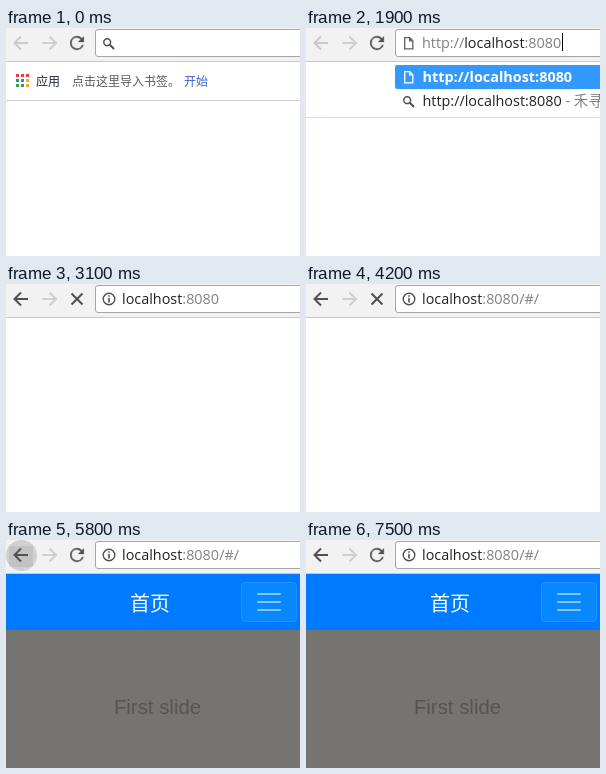
Recreate the animation shown at these times as an HTML page. Size 294 by 228 pixels, loop 8.9 s.

```html
<!DOCTYPE html>
<html lang="zh-CN">
<head>
<meta charset="utf-8">
<title>localhost:8080</title>
<style>
  html, body { margin: 0; width: 100%; height: 100%; overflow: hidden; background: #fff; }
  svg { display: block; width: 294px; height: 228px; }
  text { font-family: "Noto Sans CJK SC", "Noto Sans CJK", sans-serif; font-size: 12px; white-space: pre; }
  .url { font: 14.4px "Open Sans", "Noto Sans CJK SC", sans-serif; fill: #222; }
  .dim { fill: #808080; }
  .line { fill: none; stroke: #505050; stroke-width: 2; }
  .crisp { shape-rendering: crispEdges; }
  .layer { opacity: 0; }
</style>
</head>
<body>
<svg viewBox="0 0 294 228">
  <defs>
    <path id="arrow" class="line" d="M15 8.5 8.5 15l6.5 6.5M8.5 15H22"/>
    <path id="doc" d="M.7.7h5.1l3 3v8.1H.7zM5.6.9v3h3" fill="none" stroke-width="1.3"/>
    <g id="lens" fill="none" stroke="#505050">
      <circle cx="4.2" cy="4.2" r="3.4" stroke-width="1.5"/>
      <path d="m6.8 6.8 4.2 4.2" stroke-width="2"/>
    </g>
  </defs>

  <rect width="294" height="228" fill="#fff"/>

  <g id="page" class="layer">
    <rect y="34" width="294" height="56" fill="#007bff"/>
    <text x="144" y="71" text-anchor="middle" style="font-size:20px" fill="#fff">首页</text>
    <rect x="235.5" y="42.5" width="55" height="39" rx="3.5" fill="#0888ff" stroke="#1f92ff"/>
    <path d="M252 54h22m-22 8h22m-22 8h22" stroke="#fff" stroke-opacity=".5" stroke-width="2" stroke-linecap="round"/>
    <rect y="90" width="294" height="138" fill="#757470"/>
    <text x="151.5" y="174" text-anchor="middle" style="font:20.4px 'Liberation Sans',sans-serif" fill="#555">First slide</text>
  </g>

  <g id="bookmarks" class="layer">
    <g id="apps" class="crisp"></g>
    <text x="30" y="58" fill="#1c2340">应用</text>
    <text x="66" y="58" fill="#5a5a5a">点击这里导入书签。</text>
    <text x="178" y="58" fill="#3460d0">开始</text>
    <rect y="72" width="294" height="1" fill="#d2d2d2"/>
  </g>

  <g id="toolbar">
    <rect width="294" height="33" fill="#f2f2f2"/>
    <rect y="33" width="294" height="1" fill="#c8c8c8"/>
    <rect x="89.5" y="1.5" width="220" height="27" rx="2.5" fill="#fff" stroke="#a6a6a6"/>
    <use href="#arrow" transform="matrix(-1 0 0 1 58.5 0)" opacity=".22"/>
  </g>

  <rect id="hover" class="layer" x="3" y="6" width="24" height="21" rx="2" fill-opacity=".07"/>
  <circle id="ripple" class="layer" cx="15.5" cy="15.5" r="15.5" style="transform-origin:15.5px 15.5px"/>
  <rect id="pressed" class="layer" x="3" y="5" width="24" height="22" rx="2" fill-opacity=".13"/>

  <use id="backOff" class="layer" href="#arrow"/>
  <use id="backOn" class="layer" href="#arrow"/>
  <path id="reload" class="layer" fill="#505050" transform="translate(60.5 4.5) scale(.875)"
    d="M17.65 6.35A7.96 7.96 0 0 0 12 4a8 8 0 1 0 7.73 10h-2.08A6 6 0 1 1 12 6c1.66 0 3.14.69 4.22 1.78L13 11h7V4z"/>
  <path id="stop" class="layer line" d="m65.5 9.5 11 11m0-11-11 11"/>

  <use id="iconLens" class="layer" href="#lens" x="97" y="10"/>
  <use id="iconDoc" class="layer" href="#doc" x="98" y="9" stroke="#606060"/>
  <g id="iconInfo" class="layer">
    <circle cx="103" cy="15" r="5.8" fill="none" stroke="#505050" stroke-width="1.4"/>
    <path d="M103 11.2v1.6m0 1.2v4.5" stroke="#505050" stroke-width="1.6"/>
  </g>

  <text id="typed" class="layer url" x="116" y="20"><tspan class="dim">http://</tspan>localhost<tspan class="dim">:8080</tspan></text>
  <text id="host" class="layer url" x="116" y="20">localhost<tspan class="dim">:8080</tspan></text>
  <text id="hash" class="layer url dim" x="213.2" y="20">/#/</text>
  <rect id="caretStart" class="layer" x="116" y="5" width="1" height="18"/>
  <rect id="caretEnd" class="layer" x="256" y="5" width="1" height="18"/>

  <g id="suggest" class="layer">
    <rect y="34" width="294" height="56" fill="#fff"/>
    <rect y="89" width="294" height="1" fill="#dcdcdc"/>
    <rect x="89" y="37" width="220" height="24" rx="2" fill="#3399ff"/>
    <use href="#doc" x="98" y="43" stroke="#fff"/>
    <text class="url" x="116.5" y="54" style="font-weight:700;fill:#fff">http://localhost:8080</text>
    <use href="#lens" x="97" y="68"/>
    <text class="url" x="116.5" y="78">http://localhost:8080<tspan class="dim"> - 禾寻搜索</tspan></text>
  </g>

  <g id="menu" class="layer">
    <rect x="-.5" y="28.5" width="155" height="85" fill="#fff" stroke="#bcbcbc"/>
    <rect id="menuHover" class="layer" y="31" width="154" height="23" fill="#e8e8e8"/>
    <use href="#doc" x="11" y="37" stroke="#555"/>
    <use href="#doc" x="11" y="60" stroke="#555"/>
    <rect y="82" width="154" height="1" fill="#e2e2e2"/>
    <path d="M10 100.5a5.5 5.5 0 1 1 1.7 4M7.6 99.2l2.4 2.6 2.6-2.6M15.5 97.3v3.5l2.6 1.6" fill="none" stroke="#555" stroke-width="1.3"/>
    <g fill="#222">
      <text x="34" y="48">返回</text>
      <text x="34" y="71">新标签页</text>
      <text x="34" y="105">显示所有历史记录</text>
    </g>
  </g>
</svg>
<script>
  const LOOP = 8900;

  const red = '#ea3f3a', green = '#2f9e58', blue = '#3f7fe8', amber = '#f2ad1f';
  const grid = [red, red, red, green, blue, amber, green, green, amber];
  document.getElementById('apps').innerHTML = grid.map((fill, i) =>
    `<rect x="${10 + i % 3 * 5}" y="${46 + Math.floor(i / 3) * 5}" width="3" height="3" fill="${fill}"/>`).join('');

  // Each layer: [time in ms, opacity, optional scale], held until the next step.
  const steps = {
    bookmarks: [[0, 1], [900, 0], [2200, 1], [3100, 0]],
    suggest: [[0, 0], [900, 1], [2200, 0]],
    page: [[0, 0], [4600, 1]],
    backOff: [[0, .25], [3100, 0]],
    backOn: [[0, 0], [3100, 1]],
    reload: [[0, 1], [2200, 0], [4600, 1]],
    stop: [[0, 0], [2200, 1], [4600, 0]],
    iconLens: [[0, 1], [900, 0]],
    iconDoc: [[0, 0], [900, 1], [2300, 0]],
    iconInfo: [[0, 0], [2300, 1]],
    typed: [[0, 0], [900, 1], [2200, 0]],
    host: [[0, 0], [2200, 1]],
    hash: [[0, 0], [4200, 1]],
    caretStart: [[0, 0], [500, 1], [900, 0]],
    caretEnd: [[0, 0], [900, 1], [1400, 0], [1900, 1], [2200, 0]],
    hover: [[0, 0], [5200, 1], [6200, 0]],
    ripple: [[0, 0], [5600, .08, .5], [5700, .11, .8], [5800, .13, 1], [6100, .13, .9], [6200, 0]],
    pressed: [[0, 0], [6200, 1], [7300, .7], [7400, .3], [7500, 0]],
    menu: [[0, 0], [6100, .5], [6200, 1], [7300, .7], [7400, .3], [7500, 0]],
    menuHover: [[0, 0], [6600, 1], [7500, 0]],
  };

  for (const [id, list] of Object.entries(steps)) {
    const frames = [...list, [LOOP, ...list.at(-1).slice(1)]].map(([time, opacity, scale = 1]) => ({
      offset: time / LOOP, opacity, transform: `scale(${scale})`, easing: 'step-end',
    }));
    // Only the ripple scales; other layers keep their own transform.
    if (id !== 'ripple') frames.forEach(frame => delete frame.transform);
    document.getElementById(id).animate(frames, { duration: LOOP, iterations: Infinity });
  }
</script>
</body>
</html>
```
